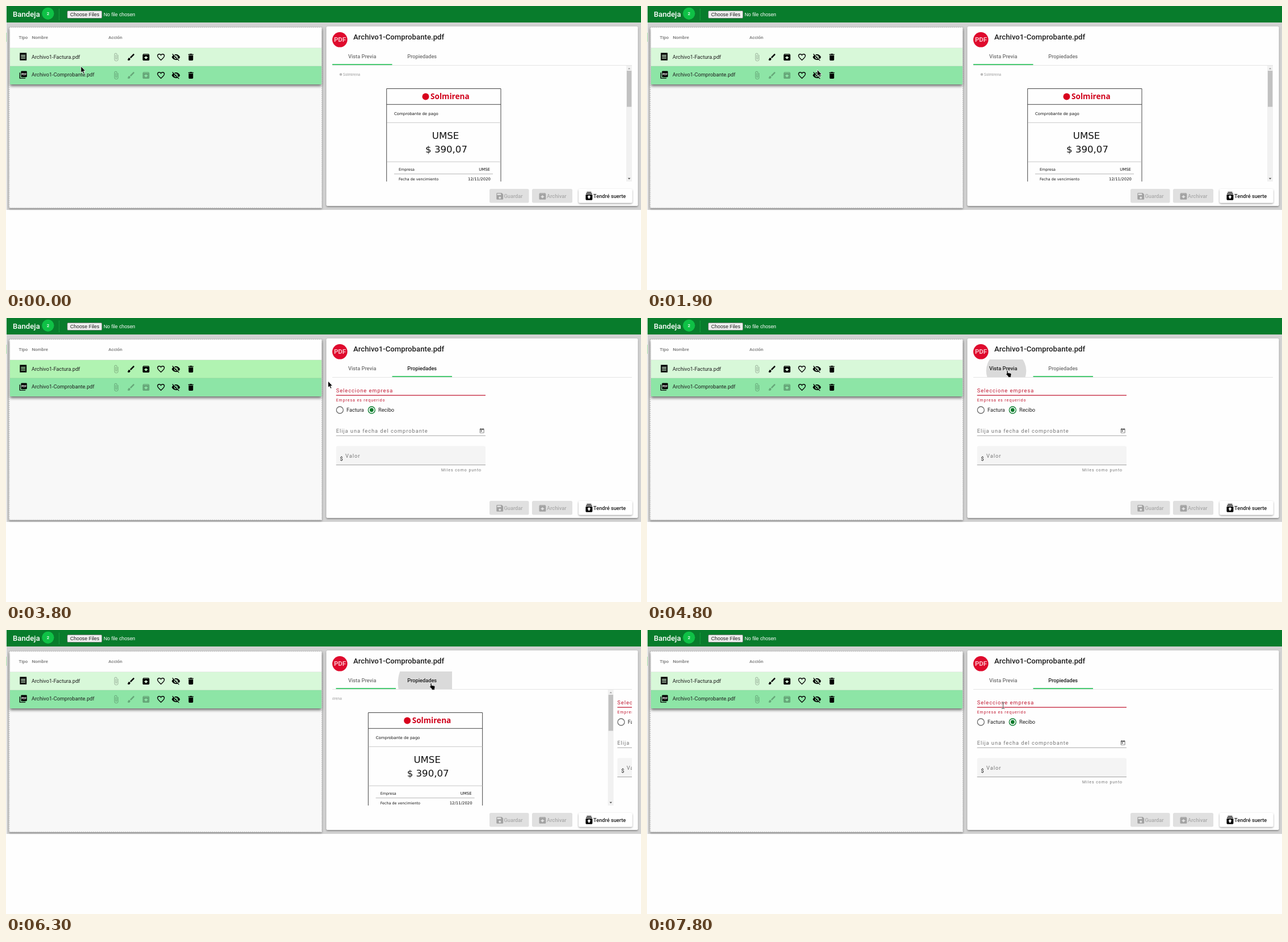
Animation, 1119 px wide and 500 px high, one loop 8000 ms. Source, as an HTML page:

```html
<!DOCTYPE html>
<html lang="es">
<head>
<meta charset="utf-8">
<title>Bandeja</title>
<style>
  html, body { margin: 0; width: 100%; height: 100%; overflow: hidden; background: #fefefe; }
  svg { display: block; }
  text { font: 9.24px Roboto, sans-serif; fill: #1d1d1d; white-space: pre; }
  .m { font-weight: 500; }
  .title { font-size: 13.2px; font-weight: 500; }
  .head { font-size: 7.92px; font-weight: 500; fill: #757575; }
  .sans { font: 8.8px "Liberation Sans", Arial, sans-serif; }
  .mid { text-anchor: middle; }
  .end { text-anchor: end; }
  .field { letter-spacing: .98px; fill: #757575; }
  .hint { font-size: 6.93px; letter-spacing: .98px; fill: #757575; }
  .field.bad, .hint.bad { fill: #c01730; }
  .doc text { font: 6.4px "DejaVu Sans", sans-serif; fill: #111; }
  .doc .note { font-size: 6.95px; }
  .doc .big { font-size: 16.6px; }
  .doc .brand { font: 700 13.6px "Open Sans", sans-serif; fill: #d0021b; }
  .doc .mini { font: 600 6.2px "Open Sans", sans-serif; fill: #aaa; }
  .off { opacity: .27; }
  .white { fill: #fff; }
</style>
</head>
<body>
<svg width="1119" height="500" viewBox="0 0 1119 500">
  <defs>
    <filter id="lift" x="-5%" y="-10%" width="110%" height="125%">
      <feDropShadow dx="0" dy="1.5" stdDeviation="1.8" flood-opacity=".4"/>
    </filter>
    <filter id="deep" x="-5%" y="-20%" width="110%" height="150%">
      <feDropShadow dx="0" dy="3" stdDeviation="2.4" flood-opacity=".55"/>
    </filter>
    <radialGradient id="fur">
      <stop offset="0" stop-color="#d9c3b2"/><stop offset=".55" stop-color="#a08274"/><stop offset="1" stop-color="#66615d"/>
    </radialGradient>
    <clipPath id="body"><rect x="575" y="105" width="528" height="204"/></clipPath>
    <clipPath id="tab0"><rect x="575" y="73" width="105.5" height="31"/></clipPath>
    <clipPath id="tab1"><rect x="680.5" y="73" width="105.5" height="31"/></clipPath>
    <clipPath id="face"><circle cx="588" cy="59" r="13.3"/></clipPath>

    <path id="attach" d="M16.5 6v11.5c0 2.21-1.79 4-4 4s-4-1.79-4-4V5c0-1.38 1.12-2.5 2.5-2.5s2.5 1.12 2.5 2.5v10.5c0 .55-.45 1-1 1s-1-.45-1-1V6H10v9.5c0 1.38 1.12 2.5 2.5 2.5s2.5-1.12 2.5-2.5V5c0-2.21-1.79-4-4-4S7 2.79 7 5v12.5c0 3.04 2.46 5.5 5.5 5.5s5.5-2.46 5.5-5.5V6h-1.5z"/>
    <path id="brush" d="M7 14c-1.66 0-3 1.34-3 3 0 1.31-1.16 2-2 2 .92 1.22 2.49 2 4 2 2.21 0 4-1.79 4-4 0-1.66-1.34-3-3-3zm13.71-9.37l-1.34-1.34c-.39-.39-1.02-.39-1.41 0L9 12.25 11.75 15l8.96-8.96c.39-.39.39-1.02 0-1.41z"/>
    <path id="archive" d="M20.54 5.23l-1.39-1.68C18.88 3.21 18.47 3 18 3H6c-.47 0-.88.21-1.16.55L3.46 5.23C3.17 5.57 3 6.02 3 6.5V19c0 1.1.9 2 2 2h14c1.1 0 2-.9 2-2V6.5c0-.48-.17-.93-.46-1.27zM12 17.5L6.5 12H10v-2h4v2h3.5L12 17.5zM5.12 5l.81-1h12l.94 1H5.12z"/>
    <path id="heart" d="M12 20C6 14.6 3 12 3 8.5C3 6 5 4 7.5 4C9.5 4 11.3 5.200 12 6.800C12.700 5.200 14.500 4 16.500 4C19 4 21 6 21 8.500C21 12 18 14.600 12 20z" fill="none" stroke="#000" stroke-width="2"/>
    <path id="hide" d="M12 7c2.76 0 5 2.24 5 5 0 .65-.13 1.26-.36 1.83l2.92 2.92c1.51-1.26 2.7-2.89 3.43-4.75-1.73-4.39-6-7.5-11-7.5-1.4 0-2.74.25-3.98.7l2.16 2.16C10.74 7.13 11.35 7 12 7zM2 4.27l2.74 2.74C3.08 8.3 1.78 10.02 1 12c1.73 4.39 6 7.5 11 7.5 1.55 0 3.03-.3 4.38-.84L19.73 22 21 20.73 3.27 3 2 4.27zM7.53 9.8l1.55 1.55c-.05.21-.08.43-.08.65 0 1.66 1.34 3 3 3 .22 0 .44-.03.65-.08l1.55 1.55c-.67.33-1.41.53-2.2.53-2.76 0-5-2.24-5-5 0-.79.2-1.53.53-2.2zm4.31-.78l3.15 3.15.02-.16c0-1.66-1.34-3-3-3z"/>
    <path id="trash" d="M6 19c0 1.1.9 2 2 2h8c1.1 0 2-.9 2-2V7H6v12zM19 4h-3.5l-1-1h-5l-1 1H5v2h14V4z"/>
    <path id="receipt" fill-rule="evenodd" d="M3 2h18v20H3zM6 7v2h12V7zm0 4v2h12v-2zm0 4v2h12v-2z"/>
    <g id="pdf">
      <path d="M3 6v15h15" fill="none" stroke="#000" stroke-width="2"/>
      <rect x="6" y="2" width="16" height="16" rx="2"/>
      <text class="white" x="7.200" y="13" style="font-size:7.5px;font-weight:700">PDF</text>
    </g>
    <path id="save" d="M17 3H5c-1.11 0-2 .9-2 2v14c0 1.1.89 2 2 2h14c1.1 0 2-.9 2-2V7l-4-4zm-5 16c-1.66 0-3-1.34-3-3s1.34-3 3-3 3 1.34 3 3-1.34 3-3 3zm3-10H5V5h10v4z"/>
    <path id="lucky" fill-rule="evenodd" d="M6 1h12v2H6zM4 4.500h16v2H4zM5 8h14q2 0 2 2v11q0 2-2 2H5q-2 0-2-2V10q0-2 2-2zM12 10l-5 5h3v4h4v-4h3z"/>
    <path id="event" fill-rule="evenodd" d="M6 1h2v2h8V1h2v2h1q2 0 2 2v14q0 2-2 2H5q-2 0-2-2V5q0-2 2-2h1zM5 8v11h14V8zM7 10h5v5H7z"/>
  </defs>

  <rect x="1" y="28" width="1118" height="331" fill="#d2d2d2"/>
  <rect y="47" width="1" height="16" fill="#b9efb9"/>
  <rect x="1" width="1118" height="29" fill="#087c2c"/>
  <text class="title white" x="12" y="19">Bandeja</text>
  <circle cx="74" cy="13.300" r="10.600" fill="#0fc146"/>
  <text class="m white mid" x="74" y="16.300" style="font-size:8px">2</text>
  <path d="M93.700 5V25" stroke="#25c653" stroke-dasharray="1.300 1.300"/>
  <rect x="108" y="8.500" width="61" height="13" rx="1.500" fill="#efefef" stroke="#666" stroke-width=".7"/>
  <text class="sans" x="113" y="18">Choose Files</text>
  <text class="sans white" x="172" y="18">No file chosen</text>

  <rect x="5" y="37" width="552" height="319" rx="2" fill="#f8f8f8" filter="url(#lift)"/>
  <g filter="url(#deep)">
    <rect x="7" y="38" width="549" height="100" fill="#fefefe"/>
    <rect id="row0" x="7" y="74" width="549" height="32"/>
    <rect id="row1" x="7" y="106" width="549" height="32"/>
  </g>
  <path d="M7 73.700H556M7 105.700H556" stroke="#000" stroke-opacity=".1" stroke-width=".7"/>
  <rect x="5.700" y="37.500" width="551" height="318" fill="none" stroke="#c4c4c4" stroke-width="1.500" stroke-dasharray="2 1.500"/>
  <text class="head" x="22.500" y="58">Tipo</text>
  <text class="head" x="45.500" y="58">Nombre</text>
  <text class="head" x="180.500" y="58">Acción</text>
  <text x="45" y="92.700">Archivo1-Factura.pdf</text>
  <text x="45" y="124.400">Archivo1-Comprobante.pdf</text>
  <g id="actions"></g>
  <g id="tip">
    <rect x="67" y="147" width="89" height="14.500" rx="2" fill="#616161"/>
    <text class="white mid" x="111.500" y="156.600" style="font-size:6.6px">Archivo1-Comprobante.pdf</text>
  </g>

  <rect x="564.500" y="36" width="549" height="316" rx="2.500" fill="#fefefe" filter="url(#lift)"/>

  <g id="empty">
    <g clip-path="url(#face)">
      <rect x="574" y="45" width="28" height="28" fill="url(#fur)"/>
      <path d="M579 56l1-9 6 5h4l6-5 1 9z" fill="#8a6552"/>
      <ellipse cx="588" cy="65" rx="6" ry="5.500" fill="#e6dcd3"/>
      <path d="M582 58h3M591 58h3M586.500 63h3" stroke="#2e2522" stroke-width="1.800"/>
    </g>
    <text class="title" x="612" y="58.700">Nada para mostrar</text>
    <text x="612" y="73" style="fill:#757575">Dog Breed</text>
    <text x="575" y="94.200">Seleccione un archivo en el panel izquierdo</text>
  </g>

  <g id="file">
    <circle cx="588.300" cy="59.300" r="13.300" fill="#df0a2d"/>
    <text class="mid" x="588.500" y="63.300" style="font-size:11.5px;font-weight:700;fill:#f9bfc7">PDF</text>
    <text class="title" x="612" y="58.700">Archivo1-Comprobante.pdf</text>
    <path d="M575 104.500H1103" stroke="#dedede" stroke-width=".8"/>
    <g clip-path="url(#tab0)"><circle id="ripple0"/></g>
    <g clip-path="url(#tab1)"><circle id="ripple1"/></g>
    <text id="label0" class="m mid" x="627.700" y="91.500">Vista Previa</text>
    <text id="label1" class="m mid" x="733.200" y="91.500">Propiedades</text>
    <rect id="ink" x="575" y="102.200" width="105.500" height="1.600" fill="#1fbf52"/>

    <g clip-path="url(#body)"><g id="track">
      <g class="doc">
        <circle cx="590" cy="120.500" r="2.300" fill="#bbb"/>
        <text class="mini" x="594" y="122.500">Solmirena</text>
        <path d="M670.700 320V145.500H872V320M670.700 173.300H872" fill="none" stroke="#444"/>
        <path d="M671 205.300H872M671 274.300H872" stroke="#bbb" stroke-width=".8"/>
        <path d="M684 295.700H858" stroke="#999" stroke-width=".7"/>
        <circle cx="739.500" cy="159.500" r="6" fill="#d8001d"/>
        <text class="brand" x="748" y="164.200">Solmirena</text>
        <text class="note" x="684" y="191.700">Comprobante de pago</text>
        <text class="big mid" x="774.500" y="234.300">UMSE</text>
        <text class="big mid" x="776" y="258.300">$ 390,07</text>
        <text x="692" y="290">Empresa</text>
        <text class="note end" x="853" y="289.700">UMSE</text>
        <text x="692" y="307.300">Fecha de vencimiento</text>
        <text class="note end" x="854" y="307">12/11/2020</text>
        <rect x="1093" y="105" width="10" height="204" fill="#f1f1f1"/>
        <rect x="1094" y="114" width="8.300" height="63.500" fill="#c1c1c1"/>
        <path d="M1095.800 111.300l2.300-2.600 2.300 2.600z" fill="#a3a3a3"/>
        <path d="M1095.800 302.700l2.300 2.600 2.300-2.600z" fill="#505050"/>
      </g>
      <g transform="translate(528)">
        <text class="field bad" x="581.700" y="131.200">Seleccione empresa</text>
        <path d="M581.700 136.200H845" stroke="#c01730" stroke-width="1.300"/>
        <text class="hint bad" x="581.700" y="147">Empresa es requerido</text>
        <circle cx="588.300" cy="162" r="6" fill="none" stroke="#6a6a6a" stroke-width="1.300"/>
        <text x="600" y="165.300">Factura</text>
        <circle cx="644.300" cy="162" r="6" fill="none" stroke="#087c2c" stroke-width="1.300"/>
        <circle cx="644.300" cy="162" r="3.400" fill="#087c2c"/>
        <text x="656" y="165.300">Recibo</text>
        <text class="field" x="581.700" y="201.700">Elija una fecha del comprobante</text>
        <use href="#event" transform="translate(833.500 193.500) scale(.43)" fill="#666"/>
        <path d="M581.700 207.200H845" stroke="#949494" stroke-width=".8"/>
        <path d="M581.700 259v-31q0-2.500 2.500-2.500h258.300q2.500 0 2.500 2.500v31z" fill="#f4f4f4"/>
        <path d="M581.700 258.700H845" stroke="#8a8a8a" stroke-width=".8"/>
        <text x="588.500" y="250.800">$</text>
        <text class="field" x="598" y="245.800">Valor</text>
        <text class="hint" x="767" y="269.700">Miles como punto</text>
      </g>
    </g></g>

    <rect x="852" y="322" width="69.500" height="24.500" rx="2.500" fill="#e0e0e0"/>
    <rect x="927" y="322" width="71" height="24.500" rx="2.500" fill="#e0e0e0"/>
    <rect x="1009" y="322" width="94.500" height="24.500" rx="2.500" fill="#fff" filter="url(#lift)"/>
    <g class="off">
      <use href="#save" transform="translate(862.300 327) scale(.66)"/>
      <text class="m" x="877.500" y="338">Guardar</text>
      <use href="#archive" transform="translate(937.500 327) scale(.66)"/>
      <text class="m" x="953" y="338">Archivar</text>
    </g>
    <use href="#lucky" transform="translate(1019.500 326.500) scale(.66)"/>
    <text class="m" x="1035" y="338">Tendré suerte</text>
  </g>

  <g id="cursor" stroke="#fff" stroke-linejoin="round">
    <path id="arrow" stroke-width=".8" d="M0 0V11.500L2.600 9.200 4.400 13.300 6.300 12.500 4.600 8.600H8z"/>
    <path id="hand" stroke-width=".6" d="M.5 .8Q1.500 -.5 2.500 .8V4.200L7 5Q8.500 5.400 8.500 7L7.800 9.500V12H2.800V10.300L-1.200 6.500Q-.8 5 .5 6z"/>
    <g id="beam" fill="none">
      <path stroke-width="2" d="M-2.500-5.500Q0-5.500 0-4V4Q0 5.500-2.500 5.500M2.500-5.500Q0-5.500 0-4M0 4Q0 5.500 2.500 5.500"/>
      <path stroke="#333" stroke-width=".9" d="M-2.500-5.500Q0-5.500 0-4V4Q0 5.500-2.500 5.500M2.500-5.500Q0-5.500 0-4M0 4Q0 5.500 2.500 5.500"/>
    </g>
  </g>
</svg>

<script>
const LOOP = 8000, TICK = 100;
const $ = id => document.getElementById(id);
const set = (id, attrs) => { for (const k in attrs) $(id).setAttribute(k, attrs[k]); };
const show = (id, on) => set(id, { display: on ? 'inline' : 'none' });
const within = (t, a, b) => t >= a && t < b;

const icon = (name, x, y, cls = '') =>
  `<use href="#${name}" class="${cls}" transform="translate(${x - 7.92} ${y - 7.92}) scale(.66)"/>`;
const tools = ['attach', 'brush', 'archive', 'heart', 'hide', 'trash'];
$('actions').innerHTML = [90, 122].map((y, row) =>
  icon(row ? 'pdf' : 'receipt', 30.3, y - 0.8) +
  tools.map((name, i) => icon(name, 194 + i * 26.35, y, i < (row ? 3 : 1) ? 'off' : '')).join('')
).join('');

function bezier(x1, y1, x2, y2) {
  const at = (s, a, b) => 3 * (1 - s) ** 2 * s * a + 3 * (1 - s) * s * s * b + s ** 3;
  return x => {
    if (x <= 0) return 0;
    if (x >= 1) return 1;
    let lo = 0, hi = 1;
    for (let i = 0; i < 24; i++) {
      const mid = (lo + hi) / 2;
      if (at(mid, x1, x2) < x) lo = mid; else hi = mid;
    }
    return at(lo, y1, y2);
  };
}
const slideEase = bezier(.35, 0, .25, 1);
const rippleEase = bezier(0, 0, .2, 1);

// time, x, y, pointer shape
const path = [
  [0, 132, 106, 'arrow'], [600, 150, 103, 'arrow'], [700, 199, 95, 'arrow'], [800, 330, 91, 'arrow'],
  [900, 520, 93, 'arrow'], [1000, 666, 101, 'hand'], [1300, 613, 88, 'hand'],
  [1700, 560, 95, 'arrow'], [1800, 420, 104, 'arrow'], [1900, 300, 112, 'arrow'],
  [2000, 200, 118, 'arrow'], [2100, 140, 122, 'beam'], [2200, 123.5, 124, 'beam'],
  [3700, 330, 100, 'arrow'], [3800, 567.5, 111, 'arrow'], [3900, 630, 117, 'arrow'],
  [4000, 654, 124, 'beam'], [4200, 633.5, 92.3, 'hand'], [5600, 650, 92.5, 'hand'],
  [5700, 690, 93, 'hand'], [5800, 730, 93, 'hand'], [5900, 747.5, 93.3, 'hand'],
  [7300, 700, 118, 'arrow'], [7400, 588, 151, 'hand'], [7600, 600, 144, 'arrow'],
  [7700, 618, 136, 'beam'], [7800, 627.5, 133, 'beam']
];
const tipSteps = [[0, 0], [100, .3], [200, .65], [300, .9], [600, .4], [700, .06], [800, 0], [2500, .06], [3400, 0]];
const ripples = [{ x: 633, y: 93, reach: 62, start: 4690 }, { x: 748, y: 93, reach: 70, start: 6087 }];
const latest = (steps, t) => steps.filter(s => s[0] <= t).pop();

function tabPosition(t) {
  if (t < 2400) return 0;
  if (t < 4800) return 1;
  if (t < 6234) return 1 - slideEase((t - 4800) / 500);
  return slideEase((t - 6234) / 500);
}

function draw(t) {
  const empty = within(t, 2400, 3400);
  show('empty', empty);
  show('file', !empty);

  const hover = within(t, 800, 1000) || within(t, 3700, 3900);
  set('row0', { fill: hover ? '#b1f3b2' : '#d8f8d9' });
  set('row1', { fill: empty ? '#b1f3b2' : '#8de5a6' });
  set('tip', { opacity: latest(tipSteps, t)[1] });

  const pos = tabPosition(t);
  set('track', { transform: `translate(${-528 * pos})` });
  set('ink', { x: 575 + 105.5 * pos });
  set('label0', { opacity: within(t, 4700, 6100) ? 1 : .62 });
  set('label1', { opacity: within(t, 3400, 4700) || t >= 6100 ? 1 : .62 });
  ripples.forEach(({ x, y, reach, start }, i) => {
    const age = t - start;
    set('ripple' + i, {
      cx: x, cy: y, r: reach * rippleEase(age / 450),
      'fill-opacity': .14 * (1 - rippleEase((age - 450) / 400))
    });
  });

  const [, x, y, shape] = latest(path, t);
  set('cursor', { transform: `translate(${x} ${y})` });
  ['arrow', 'hand', 'beam'].forEach(s => show(s, s === shape));
}

const origin = performance.now();
function frame() {
  const t = (performance.now() - origin) % LOOP;
  draw(Math.floor(t / TICK) * TICK);
  requestAnimationFrame(frame);
}
frame();
</script>
</body>
</html>
```
